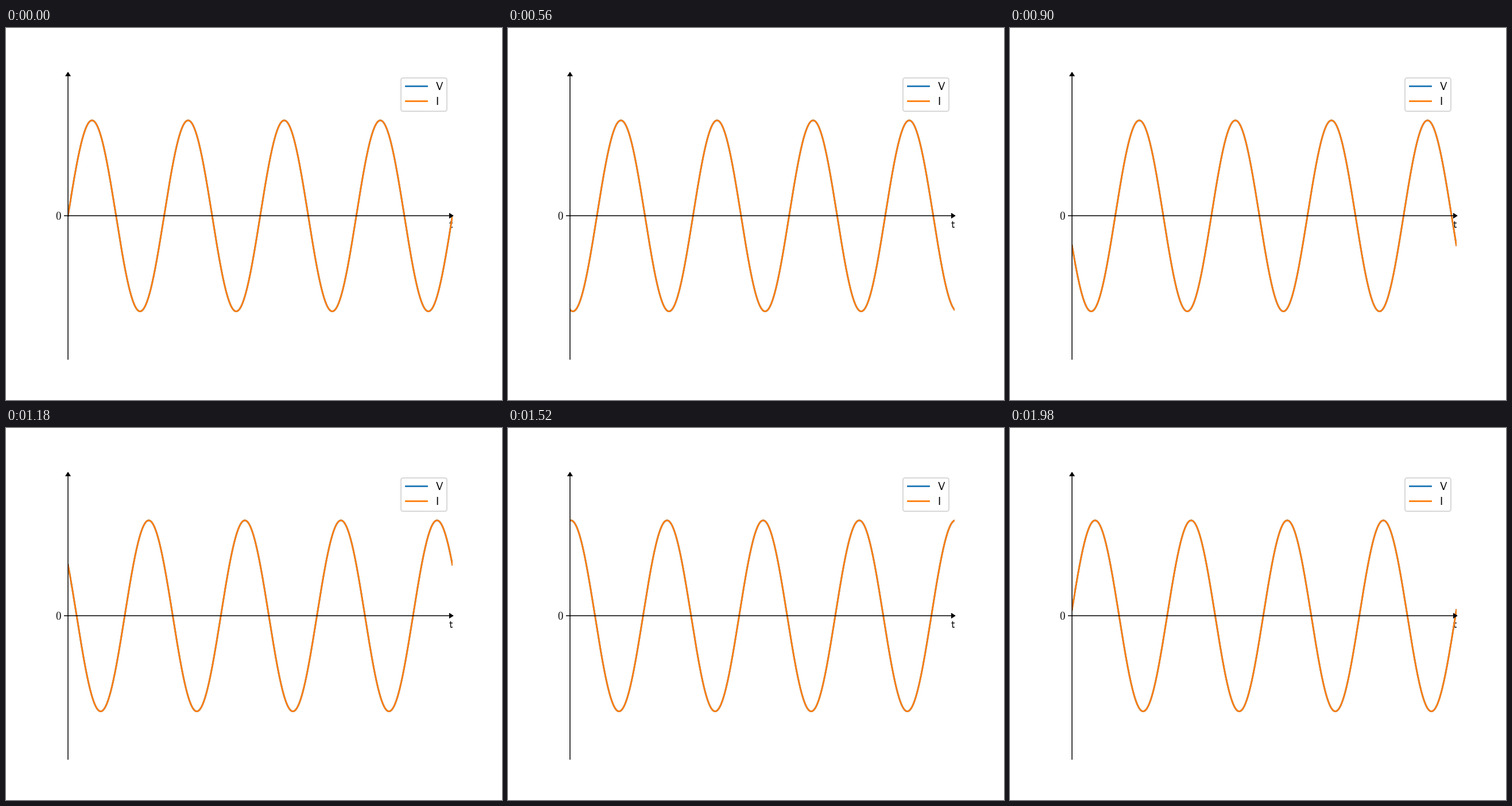
A matplotlib script that plays this animation: 864 px wide and 648 px high, repeating every 2000 ms.

```python
import numpy as np
import matplotlib.pyplot as plt
from matplotlib.animation import FuncAnimation
from matplotlib.lines import Line2D
from matplotlib.markers import CARETRIGHT, CARETUP
from matplotlib.patches import FancyBboxPatch
from matplotlib.transforms import Affine2D

W, H, DPI = 864, 648, 135
FRAMES, INTERVAL = 100, 20
CYCLES = 4

plt.rcParams["mathtext.fontset"] = "cm"

fig = plt.figure(figsize=(W / DPI, H / DPI), dpi=DPI, facecolor="white")
ax = fig.add_axes([0.125, 0.11, 0.775, 0.77])

# Pixel coordinates, origin at the top left.
px = Affine2D().scale(1 / W, -1 / H).translate(0, 1) + fig.transFigure


def label(x, y, text, z=3):
    ax.text(x, y, text, fontsize=10, color="black", ha="left", va="baseline",
            transform=px, zorder=z)


def draw_axes():
    ax.set(xlim=(0, 1), ylim=(-1.5, 1.5), xticks=[], yticks=[0])
    ax.set_yticklabels([])
    ax.spines[["top", "right"]].set_visible(False)
    ax.spines["bottom"].set_position("zero")
    arrow = dict(color="black", markersize=4, clip_on=False, linestyle="none")
    ax.plot(1, 0, marker=CARETRIGHT, transform=ax.get_yaxis_transform(), **arrow)
    ax.plot(0, 1, marker=CARETUP, transform=ax.get_xaxis_transform(), **arrow)
    label(85.5, 333.7, "$0$")
    label(770.9, 347.7, r"$\mathsf{t}$", z=1.5)


def draw_legend():
    left, top, right, bottom = 688.3, 87.1, 768.2, 144.7
    ax.add_patch(FancyBboxPatch(
        (left, top), right - left, bottom - top,
        boxstyle="round,pad=0,rounding_size=3.75", facecolor="white",
        edgecolor="0.8", linewidth=1, alpha=0.8, snap=True,
        transform=px, clip_on=False, zorder=5))
    for name, color, y in (("V", "C0", 101.1), ("I", "C1", 127.1)):
        ax.add_artist(Line2D([695.8, 733.3], [y, y], color=color, linewidth=1.5,
                             transform=px, clip_on=False, zorder=6))
        label(748.3, y + 6.5, rf"$\mathsf{{{name}}}$", z=6)


x = np.linspace(0, 1, 1000)
waves = [ax.plot(x, np.zeros_like(x), color=c, linewidth=1.5)[0]
         for c in ("C0", "C1")]
draw_axes()
draw_legend()


def update(i):
    y = np.sin(2 * np.pi * (CYCLES * x - i / FRAMES))
    for wave in waves:
        wave.set_ydata(y)
    return waves


anim = FuncAnimation(fig, update, frames=FRAMES, interval=INTERVAL,
                     repeat=True, repeat_delay=0, blit=False)
plt.show()
```
